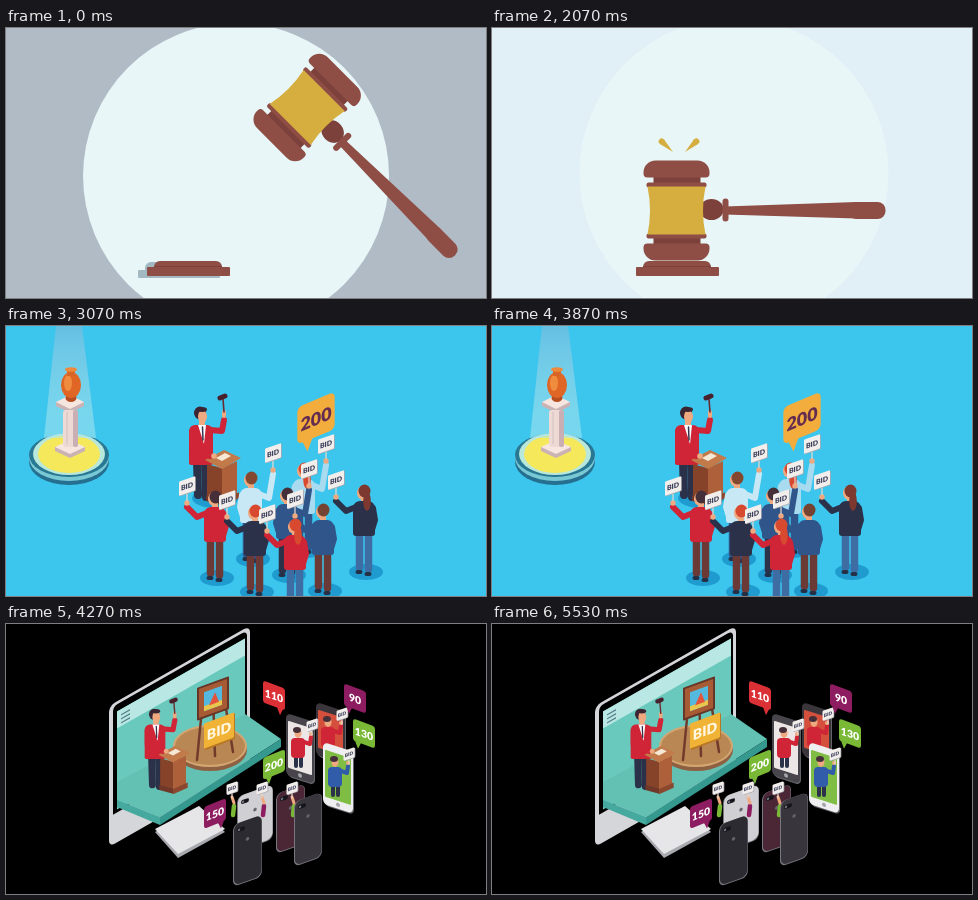
An HTML page with a canvas that plays this animation: 480 px wide and 270 px high, repeating every 5.79 s.

```html
<!DOCTYPE html>
<html lang="en">
<head>
<meta charset="utf-8">
<title>Auction</title>
<style>
html, body { margin: 0; width: 100%; height: 100%; overflow: hidden; background: #000; }
canvas { display: block; width: 480px; height: 270px; }
</style>
</head>
<body>
<canvas id="stage" width="480" height="270"></canvas>
<script>
const c = document.getElementById('stage').getContext('2d');
const LOOP = 5790, CROWD_AT = 2130, ONLINE_AT = 4000;
const FONT = 'Lato, "Open Sans", sans-serif';
const SKIN = '#efa981', WOOD = '#8e4e45', DARK_WOOD = '#7d413b', GOLD = '#d6ae40';
const RED = '#cf2536', NAVY = '#2a3149', BLUE = '#30558a', BROWN = '#6b3a36';
const GREEN = '#79b936', PLUM = '#8d1d60', GINGER = '#d84a30', BRUNETTE = '#45303a';

const clamp = v => Math.max(0, Math.min(1, v));
const mix = (a, b, u) => a + (b - a) * u;
const blend = (a, b, u) => `rgb(${a.map((v, i) => Math.round(mix(v, b[i], u)))})`;

function poly(color, ...p) {
  c.fillStyle = color;
  c.beginPath();
  for (let i = 0; i < p.length; i += 2) c.lineTo(p[i], p[i + 1]);
  c.fill();
}
function oval(color, x, y, rx, ry = rx) {
  c.fillStyle = color;
  c.beginPath();
  c.ellipse(x, y, rx, ry, 0, 0, Math.PI * 2);
  c.fill();
}
function box(color, x, y, w, h, r = 0) {
  c.fillStyle = color;
  c.beginPath();
  c.roundRect(x, y, w, h, r);
  c.fill();
}
function limb(color, width, ...p) {
  c.strokeStyle = color;
  c.lineWidth = width;
  c.lineCap = c.lineJoin = 'round';
  c.beginPath();
  for (let i = 0; i < p.length; i += 2) c.lineTo(p[i], p[i + 1]);
  c.stroke();
}
function placed(x, y, draw) {
  c.save();
  c.translate(x, y);
  draw();
  c.restore();
}
function skewed(x, y, slope, draw) {
  placed(x, y, () => {
    c.transform(1, slope, 0, 1, 0, 0);
    draw();
  });
}
function shade(top, bottom, y0, y1) {
  const g = c.createLinearGradient(0, y0, 0, y1);
  g.addColorStop(0, top);
  g.addColorStop(1, bottom);
  return g;
}
function label(text, size, color) {
  c.font = `900 ${size}px ${FONT}`;
  c.textAlign = 'center';
  c.textBaseline = 'middle';
  c.fillStyle = color;
  c.fillText(text, 0, .5);
}

// --- Gavel ---

function spark(side, grow) {
  placed(187 + side * 6, 124, () => {
    c.rotate(-Math.PI / 2 + side * .82);
    c.scale(grow, grow);
    poly(GOLD, 0, 0, 15, -3, 15, 3);
    oval(GOLD, 15.5, 0, 3);
  });
}

function block(x) {
  box(WOOD, x + 7, 233, 68, 10, [6, 6, 0, 0]);
  box(DARK_WOOD, x + 7, 238, 68, 2);
  box(WOOD, x, 239, 83, 9, 1);
}

function gavelHead() {
  for (const side of [-1, 1]) {
    c.save();
    c.scale(1, side);
    box(DARK_WOOD, -23, 27, 47, 9);
    box(WOOD, -30, 23, 60, 5, 2);
    box(WOOD, -33, 33, 66, 17, [4, 4, 12, 12]);
    c.restore();
  }
  c.fillStyle = GOLD;
  c.beginPath();
  c.moveTo(-29, -24);
  c.lineTo(29, -24);
  c.quadraticCurveTo(24, 0, 29, 24);
  c.lineTo(-29, 24);
  c.quadraticCurveTo(-24, 0, -29, -24);
  c.fill();
}

function gavel(x, y, degrees) {
  placed(x, y, () => {
    c.rotate(degrees * Math.PI / 180);
    poly(WOOD, 48, -4, 180, -8.5, 180, 8, 48, 4);
    box(WOOD, 172, -8.5, 37, 17, 8);
    oval(DARK_WOOD, 35, -1, 12, 10.5);
    box(WOOD, 46, -12, 6, 23, 3);
    gavelHead();
  });
}

function strikeScene(t) {
  const settle = 1 - (1 - clamp(t / 500)) ** 2;
  c.fillStyle = blend([176, 187, 198], [224, 240, 246], settle);
  c.fillRect(0, 0, 480, 270);
  oval('#e8f6f8', mix(230, 242, settle), mix(148, 145, settle), mix(153, 154.5, settle));

  const blockX = mix(141, 144, settle);
  c.globalAlpha = 1 - settle;
  box('#a3b9c1', blockX - 2, 234, 65, 9, [6, 6, 0, 0]);
  box('#a3b9c1', blockX - 9, 242, 82, 8, 1);
  c.globalAlpha = 1;
  block(blockX);

  // The head follows a shallow arc as the handle drops to level.
  const angle = 45 * (1 - clamp((t - 600) / 276) ** 2);
  const headX = 184.5 + 1.3 * angle + .0307 * angle ** 2 - 4 * (1 - settle);
  const headY = 182.5 - 3.93 * angle + .0365 * angle ** 2;
  gavel(headX, headY, angle);

  const grow = clamp((t - 876) / 120);
  if (grow > 0) [-1, 1].forEach(side => spark(side, grow));
}

// --- Shared figures ---

function sign(x, y, w = 16) {
  const h = w * .9;
  limb('#e9d9ce', 1.2, x, y + h / 2, x, y + h);
  skewed(x, y, -.34, () => {
    box('#aaa8b0', -w / 2 + .8, -h / 2 + .8, w, h, 1);
    box('#f2eeeb', -w / 2, -h / 2, w, h, 1);
    label('BID', w * .44, '#3d405c');
  });
}

function bubble(x, y, text, color, slope, tail, scale = 1, ink = '#fff') {
  skewed(x, y, slope, () => {
    c.scale(scale, scale);
    box(color, -11, -11.5, 22, 22, 3);
    poly(color, tail - 3, 10, tail + 3, 10, tail, 17);
    label(text, 10.5, ink);
  });
}

function podium() {
  skewed(6, 49, .28, () => box('#874329', 0, 0, 15, 34));
  skewed(21, 53, -.45, () => box('#ad6039', 0, 0, 15, 34));
  skewed(5, 80, .28, () => box('#6f3828', 0, 0, 16, 6));
  skewed(21, 85, -.45, () => box('#8b482e', 0, 0, 17, 6));
  poly('#c27a4b', 4, 45, 23, 35, 40, 43, 21, 54);
  poly('#f5e8d4', 15, 43, 24, 38, 30, 41, 21, 46);
}

function auctioneer(x, y, scale) {
  placed(x, y, () => {
    c.scale(scale, scale);
    limb(NAVY, 8, -4, 46, -3, 80);
    limb(NAVY, 8, 4, 46, 5, 82);
    box(SKIN, -2, 4, 6, 9, 2);
    box(RED, -12, 10, 24, 40, [6, 6, 2, 2]);
    poly('#fff', -3, 10, 5, 10, 3, 29);
    limb('#34314a', 1.5, 1.5, 12, 2, 25);
    limb(RED, 6, 9, 15, 21, 16, 23, 5);
    limb(SKIN, 4, 23, 1, 23, -3);
    limb('#6c2a31', 1.6, 23, -3, 22, -16);
    limb('#49212d', 5, 19, -17, 24, -19);
    oval('#3b2533', -1, -2, 6, 6.5);
    oval(SKIN, 1.5, 1.5, 4.5, 6.5);
    oval('#3b2533', 1, -5.5, 5, 2.5);
    podium();
    limb(RED, 6, -9, 17, -9, 33, 9, 41);
    oval(SKIN, 13, 41, 2.8);
  });
}

// --- Auction room ---

function bidder(x, y, { hair, shirt, legs, side = -1, long }) {
  placed(x, y, () => {
    const handX = side < 0 ? -28 : 22, handY = side < 0 ? 5 : -9;
    oval('#1f9bd0', 2, 80, 17, 8);
    for (const leg of [-1, 1]) {
      limb(legs, 7.5, leg * 4.5, 42, leg * 4.5, 76 + leg);
      limb('#253047', 4, leg * 4.5 - 2, 81 + leg, leg * 4.5 + 1, 81 + leg);
    }
    limb(shirt, 6, -side * 9, 16, -side * 11, 28, -side * 8, 38);
    box(SKIN, -3, 4, 6, 8, 2);
    box(shirt, -11, 9, 22, 35, [7, 7, 3, 3]);
    limb(shirt, 6, side * 8, 15, side * 18, 19, handX, handY + 4);
    oval(SKIN, handX, handY, 2.7);
    oval(SKIN, -2, 1, 5, 6.5);
    oval(hair, .5, -1, 6, 6.5);
    if (long) oval(hair, 3, 9, 3.8, 10);
    sign(handX, handY - 17);
  });
}

// Rows run along the floor's diagonal, back row first.
const rows = [
  { x: 298, y: 144, dx: 60, dy: 22, looks: [
    { hair: GINGER, shirt: '#a8daf0', legs: BLUE, side: 1, long: true },
    { hair: '#7d3830', shirt: NAVY, legs: '#3d6da2', long: true }] },
  { x: 245, y: 153, dx: 36, dy: 16, looks: [
    { hair: '#83482f', shirt: '#c8e8f5', legs: BLUE, side: 1 },
    { hair: BRUNETTE, shirt: BLUE, legs: NAVY, side: 1 },
    { hair: '#754331', shirt: BLUE, legs: BROWN }] },
  { x: 209, y: 172, dx: 40, dy: 14, looks: [
    { hair: BRUNETTE, shirt: RED, legs: BROWN },
    { hair: GINGER, shirt: NAVY, legs: BROWN },
    { hair: GINGER, shirt: RED, legs: '#3d6da2', long: true }] },
];

function pedestal() {
  placed(63, 128, () => {
    oval('#256f91', 0, 8, 40, 23);
    oval('#79c9d5', 0, 4, 40, 23);
    oval('#287793', 0, 1, 40, 22);
    oval('#b8e8db', 0, 0, 36, 21);
    oval('#f5e85b', 0, 0, 31, 19);
  });
  poly(shade('#64bfe3', '#a9e7ef88', 0, 110), 50, 0, 76, 0, 90, 112, 38, 112);
  placed(64, 0, () => {
    for (const [y, w] of [[121, 15], [76, 14]]) {
      poly('#cbb2b5', -w, y, w, y, w, y + 4, 0, y + 11, -w, y + 4);
      poly('#f6e6df', -w, y, 0, y - 7, w, y, 0, y + 7);
    }
    box('#eddad5', -7, 84, 15, 37, 3);
    box('#c9afb4', 3, 84, 5, 37, 2);
    limb('#d3bfc1', 1, -3, 86, -3, 118);
  });
  oval('#b64c1f', 65, 72, 5.5, 4);
  oval('#df6625', 65, 59, 10, 13);
  oval('#f08c3d', 62, 57, 4, 8);
  box('#d86526', 61, 43, 8, 7);
  oval('#ef8a3c', 65, 43.5, 6, 2.3);
}

function crowdScene() {
  c.fillStyle = '#3cc6ed';
  c.fillRect(0, 0, 480, 270);
  pedestal();
  oval('#1f9bd0', 209, 172, 23, 10);
  auctioneer(195, 89, 1);
  bubble(310, 93, '200', '#f2ad3d', -.42, -5, 1.7, '#642d50');
  for (const { x, y, dx, dy, looks } of rows)
    looks.forEach((look, i) => bidder(x + i * dx, y + i * dy, look));
}

// --- Online auction ---

function monitor() {
  poly('#a9aab0', 149, 208, 193, 184, 219, 208, 172, 234);
  poly('#e6e6e9', 149, 205, 193, 182, 219, 205, 172, 230);
  skewed(103, 82, -.57, () => {
    box('#d5d6d9', 0, 0, 141, 141, 6);
    box('#000', 4, 3, 134, 108, [5, 5, 0, 0]);
    box('#69c9bd', 8, 10, 128, 98);
    box('#b8e7e4', 8, 10, 128, 17);
    for (let i = 0; i < 3; i++) box('#547f87', 12, 15 + i * 4, 9, 1.4);
  });
  poly('#62c1b3', 111, 158, 239, 90, 275, 115, 154, 193, 111, 176);
  poly('#45a99f', 111, 176, 154, 193, 154, 201, 111, 183);
  poly('#35998f', 154, 193, 275, 115, 275, 123, 154, 201);
}

function easel() {
  oval('#8e6042', 204, 126, 37, 21);
  oval('#d4a772', 204, 122, 37, 21);
  oval('#b98754', 204, 122, 35, 19);
  for (const leg of [-1, 0, 1])
    limb('#713b2b', 2.5, 207 + leg * 10, 70 - leg * 4, 209 + leg * 18, 132 - leg * 4);
  skewed(207, 75, -.36, () => {
    box('#653528', -16, -17, 32, 33, 1);
    box('#a65b35', -14, -15, 28, 29);
    box('#55b9df', -9, -10, 18, 19);
    box('#e9c74d', -9, 4, 18, 5);
    poly('#e4533c', -4, 5, 2, -6, 6, 5);
  });
  skewed(213, 107, -.38, () => {
    box('#b97725', -14, -12, 30, 26, 1);
    box('#f0b336', -15, -13, 30, 25, 1);
    label('BID', 14, '#fff7df');
  });
}

function phoneBack(x, y, w, h, body) {
  skewed(x, y, -.36, () => {
    box('#77777f', 0, 0, w, h, 6);
    box(body, 1, 0, w - 1.5, h - 1, 6);
    box('#15151b', 4, 5, 8, 4, 2);
    oval('#777986', 6, 7, 1.2);
    oval('#65636d', w / 2, 19, 1.7);
  });
}

function phoneFront(x, y, w, h, body, screen, shirt) {
  skewed(x, y, .32, () => {
    box('#626269', 1, 1, w, h, 5);
    box(body, 0, 0, w, h, 5);
    box(screen, 2, 7, w - 4, h - 15, 1);
    oval('#a5a5aa', w / 2, h - 4, 2);
  });
  placed(x + 12, y + 20, () => {
    for (const leg of [-2, 3]) limb(NAVY, 4, leg, 22, leg, 33);
    box(shirt, -7, 5, 14, 20, 4);
    limb(shirt, 4, 6, 9, 12, 11, 13, 4);
    oval(SKIN, 13, 1, 2);
    oval(SKIN, 0, 0, 3.5, 5);
    oval(BRUNETTE, -1, -3, 4, 3);
  });
  sign(x + 26, y + 12, 11);
}

function onlineScene() {
  c.fillStyle = '#000';
  c.fillRect(0, 0, 480, 270);
  monitor();
  easel();
  auctioneer(149, 92, .86);

  phoneFront(310, 78, 29, 53, '#3a353b', '#d5503c', RED);
  phoneFront(280, 89, 28, 62, '#47454b', '#ece6e6', RED);
  phoneFront(317, 118, 30, 62, '#efeff1', '#80bd45', '#315caa');

  phoneBack(231, 173, 36, 55, '#cfcfd4');
  phoneBack(270, 170, 29, 60, '#4b2634');
  for (let i = 0; i < 3; i++) {
    const x = 226 + i * 30;
    limb(i % 2 ? PLUM : GREEN, 4.5, x + 1, 191, x + 2, 182);
    limb(SKIN, 3, x + 2, 179, x, 173);
    sign(x, 164, 11);
  }
  phoneBack(227, 201, 29, 62, '#2c2b32');
  phoneBack(288, 178, 28, 65, '#38353d');

  bubble(268, 72, '110', '#dc3037', .36, 6);
  bubble(349, 75, '90', PLUM, .36, -6);
  bubble(358, 110, '130', GREEN, .36, -6);
  bubble(268, 141, '200', GREEN, -.4, -5);
  bubble(209, 190, '150', PLUM, -.4, 6);
}

const start = performance.now();
function frame() {
  const t = Math.max(0, performance.now() - start) % LOOP;
  if (t < CROWD_AT) strikeScene(t);
  else if (t < ONLINE_AT) crowdScene();
  else onlineScene();
  requestAnimationFrame(frame);
}
frame();
</script>
</body>
</html>
```
